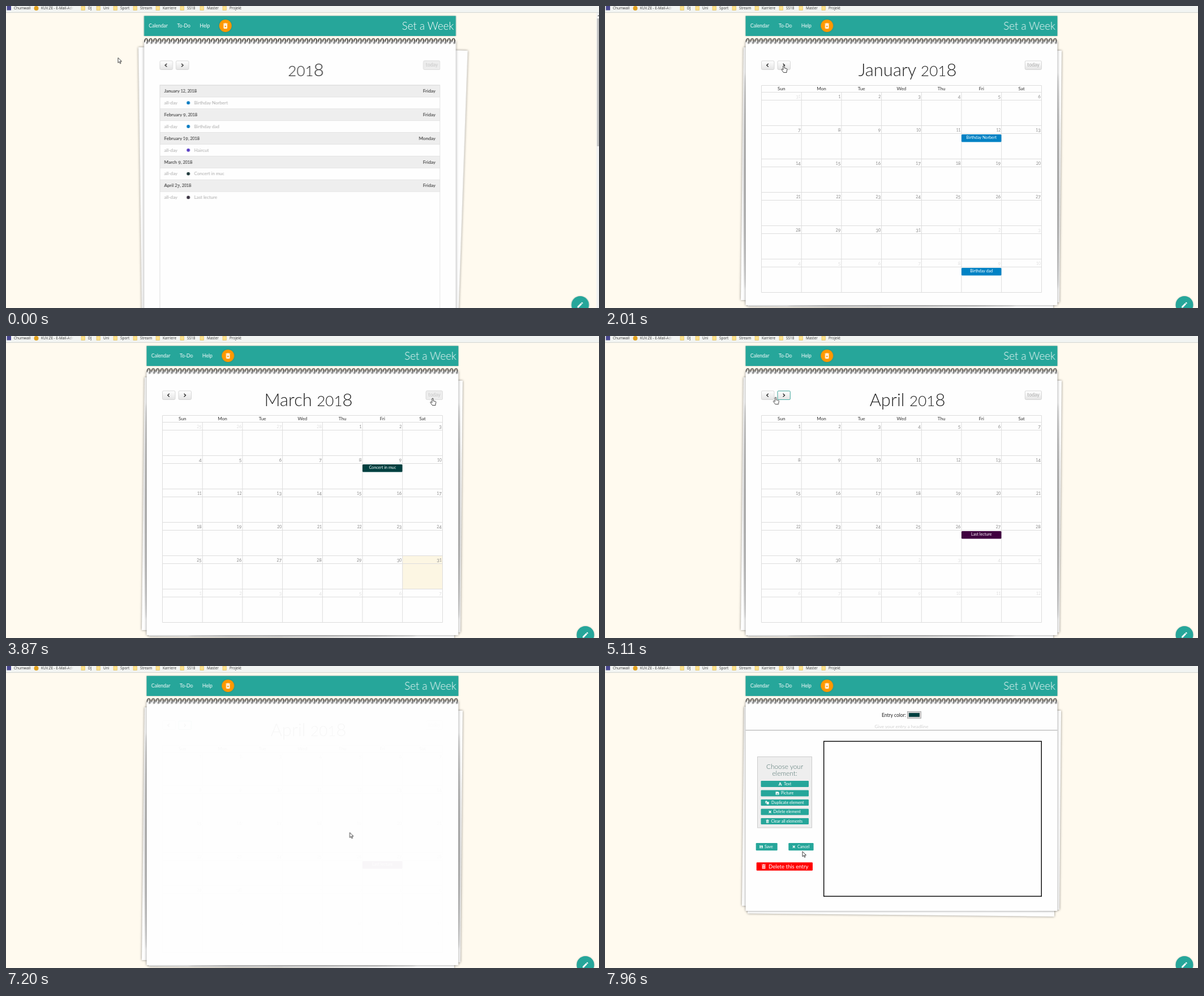
Write an HTML page that moves like this. It is 1048 px wide and 534 px high and loops after 8 s.

```html
<!DOCTYPE html>
<html lang="en">
<head>
<meta charset="utf-8">
<title>Calendar demo</title>
<style>
html, body { margin: 0; width: 100%; height: 100%; overflow: hidden; background: #fffaef; }
svg { display: block; width: 100vw; height: 100vh; font-family: Lato, "Open Sans", sans-serif; }
text { white-space: pre; }
.bookmark { font-family: "Open Sans", "Noto Sans", sans-serif; }
.sheet { fill: #fefefe; filter: drop-shadow(0 .5px 2px rgba(0,0,0,.45)); }
.bend { fill: #000; opacity: .42; filter: blur(2px); }
.raised { filter: drop-shadow(0 .8px 1.2px rgba(0,0,0,.25)); }
.grid { fill: none; stroke: #ddd; }
.middle { text-anchor: middle; }
.end { text-anchor: end; }
.light { font-weight: 300; }
</style>
</head>
<body>
<svg id="stage" viewBox="0 0 1048 534" xmlns="http://www.w3.org/2000/svg"></svg>
<script>
const LOOP = 8000, TEAL = '#26a69a';
const LEFT = 276.5, TOP = 152.5, COL = 70.7, ROW = 59;
const MONTHS = ['January', 'February', 'March', 'April'];
const DAYS = ['Sunday', 'Monday', 'Tuesday', 'Wednesday', 'Thursday', 'Friday', 'Saturday'];
const EVENTS = [
  { month: 0, day: 12, name: 'Birthday Norbert', color: '#0082c4', dot: '#0a7cc2' },
  { month: 1, day: 9, name: 'Birthday dad', color: '#0082c4', dot: '#0a7cc2' },
  { month: 1, day: 19, name: 'Haircut', color: '#8000ff', dot: '#5a40c4' },
  { month: 2, day: 9, name: 'Concert in muc', color: '#004040', dot: '#203a3c' },
  { month: 3, day: 27, name: 'Last lecture', color: '#400040', dot: '#3b3442' }
];
const ICONS = {
  bin: 'M6 19c0 1.1.9 2 2 2h8c1.1 0 2-.9 2-2V7H6zm2.5-7.1 1.4-1.4 2.1 2.1 2.1-2.1 1.4 1.4-2.1 2.1 2.1 2.1-1.4 1.4-2.1-2.1-2.1 2.1-1.4-1.4 2.1-2.1zM15.5 4l-1-1h-5l-1 1H5v2h14V4z',
  pen: 'M3 17.2V21h3.8L17.8 9.9l-3.7-3.7zM20.7 7c.4-.4.4-1 0-1.4l-2.3-2.3c-.4-.4-1-.4-1.4 0l-1.8 1.8 3.7 3.7z',
  letter: 'M9 3h5l6 16h2v2h-8v-2h2l-1-4H9l-1 4h2v2H2v-2h2zM10 12h4l-2-6z',
  image: 'M2 3h15l5 5v13H2zM5 18h14l-5-7-3 4-2-2z',
  copy: 'M2 2h9v5H7v9H2zM9 8h13v14H9z',
  cross: 'M4 7l3-3 5 5 5-5 3 3-5 5 5 5-3 3-5-5-5 5-3-3 5-5z',
  trash: 'M5 8h14v14H5zM8 10v10h2V10zM14 10v10h2V10zM3 4h6V2h6v2h6v2H3z',
  disk: 'M3 3h14l4 4v14H3zM7 5v5h8V5zM7 14v5h10v-5z'
};

// Old-style figures: 0-2 are lower, 3-5, 7 and 9 hang below the line.
function oldStyle(string, size) {
  let shift = 0;
  return [...string].map(char => {
    const next = /[34579]/.test(char) ? size * .14 : 0;
    const small = /[012]/.test(char);
    const dy = next - shift;
    shift = next;
    if (!dy && !small) return char;
    return `<tspan dy="${dy.toFixed(2)}"${small ? ` font-size="${(size * .84).toFixed(2)}"` : ''}>${char}</tspan>`;
  }).join('');
}
const text = (x, y, string, size, fill, cls = '') =>
  `<text x="${x}" y="${y}" font-size="${size}" fill="${fill}" class="${cls}">${oldStyle(string, size)}</text>`;
const rect = (x, y, w, h, fill, extra = '') =>
  `<rect x="${x}" y="${y}" width="${w}" height="${h}" fill="${fill}" ${extra}/>`;
const icon = (name, x, y, size, fill = '#fff') =>
  `<path d="${ICONS[name]}" fill="${fill}" fill-rule="evenodd" transform="translate(${x} ${y}) scale(${size / 24})"/>`;
const group = (id, content) => `<g id="${id}">${content}</g>`;
const repeat = (n, draw) => Array.from({ length: n }, (_, i) => draw(i)).join('');
const sheet = points => `<polygon class="sheet" points="${points}"/>`;
const bend = (x, y, rx, ry) => `<ellipse class="bend" cx="${x}" cy="${y}" rx="${rx}" ry="${ry}"/>`;
const paper = bottom => rect(248.5, 62, 551, bottom - 62, '#fff', 'class="sheet"');

function bookmarks() {
  const folders = [[133, 'DJ'], [160, 'Uni'], [190, 'Sport'], [225, 'Stream'], [265, 'Karriere'],
    [308, 'SS18'], [343, 'Master'], [383, 'Projekt']];
  const label = (x, s, fill = '#333') =>
    `<text x="${x}" y="6.3" font-size="6.4" fill="${fill}" class="bookmark">${s}</text>`;
  return rect(0, 0, 1048, 11.5, '#f2f4f2') + rect(0, 11, 1048, 1, '#d3d5d2') +
    rect(1.5, 0, 7.5, 7.5, '#48468f') + label(14, 'Chumwall') +
    '<circle cx="53.5" cy="4" r="4" fill="#e0a020"/>' + label(62, 'KUV.ZE - E-Mail-Adr', 'url(#cut)') +
    folders.map(([x, s]) =>
      rect(x, .5, 6.5, 7, '#fbe08a', 'stroke="#e3bd55" stroke-width=".6"') + label(x + 12, s)).join('');
}

function header() {
  return rect(248.5, 17.5, 551, 35.5, TEAL, 'class="raised"') +
    group('hover', rect(248.5, 17.5, 50.5, 35.5, '#fff', 'opacity=".1"')) +
    text(256.7, 38, 'Calendar', 8.6, '#fff') + text(307, 38, 'To-Do', 8.6, '#fff') +
    text(347, 38, 'Help', 8.6, '#fff') +
    '<circle cx="392.3" cy="35" r="11" fill="#ff9800" class="raised"/>' + icon('bin', 385.8, 28.5, 13) +
    text(796, 41.5, 'Set a Week', 18.8, '#fff', 'end light');
}

const spiral = () => rect(248.5, 56.5, 551, 11, 'url(#coil)');

function toolbar() {
  const key = (x, w) => rect(x, 97, w, 15.5, 'url(#key)', 'rx="2" stroke="#cfcfcf" stroke-width=".8"');
  const chevron = (x, d) =>
    `<path d="M${x} 102l${d} 2.8l${-d} 2.8" fill="none" stroke="#222" stroke-width="1.3"/>`;
  return key(276.5, 22.5) + key(305, 22.5) + key(742.3, 29.2) +
    chevron(288.7, -3) + chevron(314.6, 3) + text(757, 107.3, 'today', 8.6, '#aaa', 'middle') +
    group('focus', rect(305, 97.2, 22.3, 15.3, 'none', `rx="1.5" stroke="${TEAL}" stroke-width=".8"`)) +
    group('disabled', rect(742.3, 97, 29.2, 15.5, '#ededed', 'rx="2" stroke="#ddd" stroke-width=".8"') +
      text(757, 107.3, 'today', 8.6, '#c6c6c6', 'middle'));
}

const title = string => text(534.5, 124, string, 31, '#222', 'middle light');

function agenda() {
  const rows = EVENTS.map((e, i) => {
    const y = 140 + i * 41.8;
    const weekday = DAYS[new Date(2018, e.month, e.day).getDay()];
    return rect(LEFT, y, 495, 21, '#eee', 'stroke="#ddd" stroke-width=".7"') +
      text(284, y + 13.2, `${MONTHS[e.month]} ${e.day}, 2018`, 8.1, '#222') +
      text(763.5, y + 13.2, weekday, 8.2, '#222', 'end') +
      text(284, y + 34, 'all-day', 8.1, '#aaa') +
      `<circle cx="326.7" cy="${y + 31.2}" r="2.9" fill="${e.dot}"/>` +
      text(337, y + 34, e.name, 8, '#aaa');
  }).join('');
  return title('2018') + rows + rect(LEFT, 140, 495, 420, 'none', 'stroke="#ddd"');
}

function month(m) {
  const offset = new Date(2018, m, 1).getDay();
  let days = '', bars = '', today = '';
  for (let i = 0; i < 42; i++) {
    const date = new Date(2018, m, 1 - offset + i);
    const x = LEFT + (i % 7) * COL, y = TOP + Math.floor(i / 7) * ROW;
    const inside = date.getMonth() === m;
    if (date.getMonth() === 2 && date.getDate() === 31) today = rect(x, y, COL, ROW, '#fcf6e3');
    days += text((x + COL - 1.5).toFixed(1), y + 10, String(date.getDate()), 8, inside ? '#888' : '#dedede', 'end');
    const event = EVENTS.find(e => e.month === date.getMonth() && e.day === date.getDate());
    if (event) bars += rect(x, y + 15.6, COL - .2, 13.4, event.color, 'rx="1.5"') +
      text(x + COL / 2, y + 23.6, event.name, 7.2, '#fff', 'middle');
  }
  const lines = repeat(6, r => `M${LEFT} ${TOP + r * ROW}h495m-495 14h495`) +
    repeat(6, c => `M${(LEFT + COL * (c + 1)).toFixed(1)} ${TOP - 12}v366`);
  const names = DAYS.map((d, c) =>
    text(LEFT + COL * (c + .5), 149, d.slice(0, 3), 8.2, '#333', 'middle')).join('');
  const header = rect(LEFT + .5, 141, 494, 11, '#fefefe');
  return title(`${MONTHS[m]} 2018`) + today +
    `<path class="grid" d="M${LEFT} 140.5h495v366h-495z${lines}"/>` + header + names + days + bars;
}

function editor() {
  const button = (x, y, w, h, label, labelX, name, iconX, size = 7.2, fill = TEAL, cls = '') =>
    rect(x, y, w, h, fill, 'rx="1.3"') + icon(name, iconX, y + h / 2 - size / 2, size) +
    text(labelX, y + h / 2 + size * .34, label, size, '#fff', cls);
  const tools = [['Text', 316, 'letter', 306], ['Picture', 311, 'image', 301],
    ['Duplicate element', 294, 'copy', 283], ['Delete element', 297.5, 'cross', 288],
    ['Clear all elements', 293.5, 'trash', 283.5]];
  return text(489, 89.5, 'Entry color:', 8.5, '#222') +
    rect(534.5, 80.5, 24, 12, '#ddd', 'stroke="#aaa"') + rect(537, 83, 19, 7, '#004040', 'stroke="#777" stroke-width=".5"') +
    text(524, 109.8, 'Give your entry a headline', 8.3, '#d2d2d2', 'middle') +
    rect(248.5, 113, 551, 1, '#aaa') +
    rect(269.5, 160.5, 96, 125.5, '#eee', 'stroke="#ccc"') +
    text(317.5, 181.5, 'Choose your', 11.9, '#4c6f6b', 'middle light') +
    text(317.5, 193.5, 'element:', 11.9, '#4c6f6b', 'middle light') +
    tools.map((tool, i) => button(275.5, 203 + i * 16.5, 84.5, 11, ...tool)).join('') +
    button(266.7, 313, 38, 13.3, 'Save', 282, 'disk', 272.5) +
    button(324.3, 313, 44.3, 13.3, 'Cancel', 340, 'cross', 330.2) +
    button(267.7, 347.3, 99.3, 14.5, 'Delete this entry', 289, 'trash', 275.7, 9.6, '#f00') +
    rect(386.7, 133.2, 384.6, 274, '#fefefe', 'stroke="#000" stroke-width="1.4"');
}

const cursor = () =>
  group('arrow', '<path d="M0 0v9l2.1-2 1.5 3.3 1.5-.7-1.5-3.2h2.9z" fill="#fff" stroke="#111" stroke-width=".8"/>') +
  group('hand', '<path d="M-1.1.8q1.1-1.5 2.2 0v4l3.8.9q1.2.4 1 1.7l-.9 3.6v1.6h-5.5l-3.5-5q0-1.4 1.3-1l1.6 1.2z" fill="#fff" stroke="#111" stroke-width=".8"/>');

document.getElementById('stage').innerHTML = `
  <defs>
    <linearGradient id="key" x2="0" y2="1"><stop stop-color="#fff"/><stop offset="1" stop-color="#e4e4e4"/></linearGradient>
    <linearGradient id="cut"><stop offset=".8" stop-color="#333"/><stop offset="1" stop-color="#f2f4f2"/></linearGradient>
    <pattern id="coil" x="248.5" y="56.5" width="7.87" height="11" patternUnits="userSpaceOnUse">
      <path d="M.8 7.5C1 3 2.4 1.2 4 1.2S6.4 3.500 6 7.500" fill="none" stroke="#111" stroke-width="1.3"/>
      <circle cx="5.300" cy="8.600" r="1.200" fill="#fff" stroke="#111" stroke-width=".9"/>
    </pattern>
  </defs>` +
  group('page',
    group('paperAgenda', sheet('238.5,73 300,73 300,560 244.9,560') + sheet('820.5,79 700,75 700,560 803.6,560') + paper(700)) +
    group('paperMonth', sheet('252,400 792,400 792,535 252,531') + sheet('245,73 807,79 803,524 240,520') +
      bend(250, 310, 4, 190) + bend(798, 310, 4, 190) + bend(524, 528.5, 200, 2) + paper(529)) +
    group('paperEditor', sheet('252,300 794,300 794,443 252,437.5') + sheet('246,72 806,79 803,431 242,424') + paper(433)) +
    header() + spiral() +
    group('calendar', toolbar() + group('agenda', agenda()) + repeat(4, m => group('month' + m, month(m)))) +
    group('editor', editor())) +
  group('scrollbar', rect(1043.5, 12, 5, 522, '#f1f1f1') + rect(1044.5, 22, 4, 226, '#c1c1c1') +
    '<path d="M1045 18l3-2v2z" fill="#555"/>') +
  group('fab', `<circle cx="1024" cy="528.5" r="15.5" fill="${TEAL}" class="raised"/>` + icon('pen', 1017.5, 522, 13)) +
  bookmarks() + group('cursor', cursor());

let css = '';
function animate(id, frames, timing = 'linear') {
  const steps = frames.map(([ms, rule]) => `${ms * 100 / LOOP}%{${rule}}`).join('');
  css += `@keyframes ${id}{${steps}}#${id}{animation:${id} ${LOOP}ms ${timing} infinite}`;
}
function showDuring(id, ...spans) {
  const frames = spans.flatMap(([from, to]) => [[from, 'opacity:1'], [to, 'opacity:0']]);
  animate(id, [[0, 'opacity:0'], ...frames], 'step-end');
}
const slide = (id, x) =>
  animate(id, [[0, `transform:translate(${x}px)`], [830, 'transform:none']], 'step-end');

slide('page', -4.5);
slide('fab', -9.3);
showDuring('scrollbar', [0, 830]);
showDuring('paperAgenda', [0, 830]);
showDuring('paperMonth', [830, 7260]);
showDuring('paperEditor', [7260, LOOP]);
showDuring('agenda', [0, 830]);
showDuring('month0', [830, 2200]);
showDuring('month1', [2200, 3870]);
showDuring('month2', [3870, 4900]);
showDuring('month3', [4900, LOOP]);
showDuring('hover', [600, 1240]);
showDuring('focus', [2100, 3720], [4820, 7260]);
showDuring('disabled', [0, 830], [3720, 4900]);
showDuring('hand', [600, 1040], [1900, 2790], [3440, 3980], [4600, 5180]);
showDuring('arrow', [0, 600], [1040, 1900], [2790, 3440], [3980, 4600], [5180, LOOP]);
animate('calendar', [[0, 'opacity:1'], [6800, 'opacity:1'], [7260, 'opacity:0'], [LOOP, 'opacity:0']], 'ease-in-out');
animate('editor', [[0, 'opacity:0'], [7260, 'opacity:0'], [7740, 'opacity:1'], [LOOP, 'opacity:1']], 'ease-in-out');
animate('cursor', [
  [0, 198, 91.5], [290, 198, 91.5], [680, 270, 36], [1000, 270, 36], [1160, 160, 59], [1240, 160, 59],
  [1700, 350, 118], [1950, 316, 105], [2789, 316, 105], [2790, 382.5, 116.5], [3050, 540, 133],
  [3300, 690, 121], [3490, 754, 110], [3900, 754, 110], [4200, 600, 68], [4450, 430, 80], [4650, 319, 106],
  [4950, 319, 106], [5110, 301.5, 108], [5200, 298, 114], [5500, 326, 278], [5850, 420, 313],
  [6340, 608, 296], [6420, 613, 296], [6570, 607.5, 294.5], [7400, 607.5, 294.5], [7960, 349, 328], [LOOP, 349, 328]
].map(([ms, x, y]) => [ms, `transform:translate(${x}px,${y}px)`]));
document.head.appendChild(document.createElement('style')).textContent = css;
</script>
</body>
</html>
```
